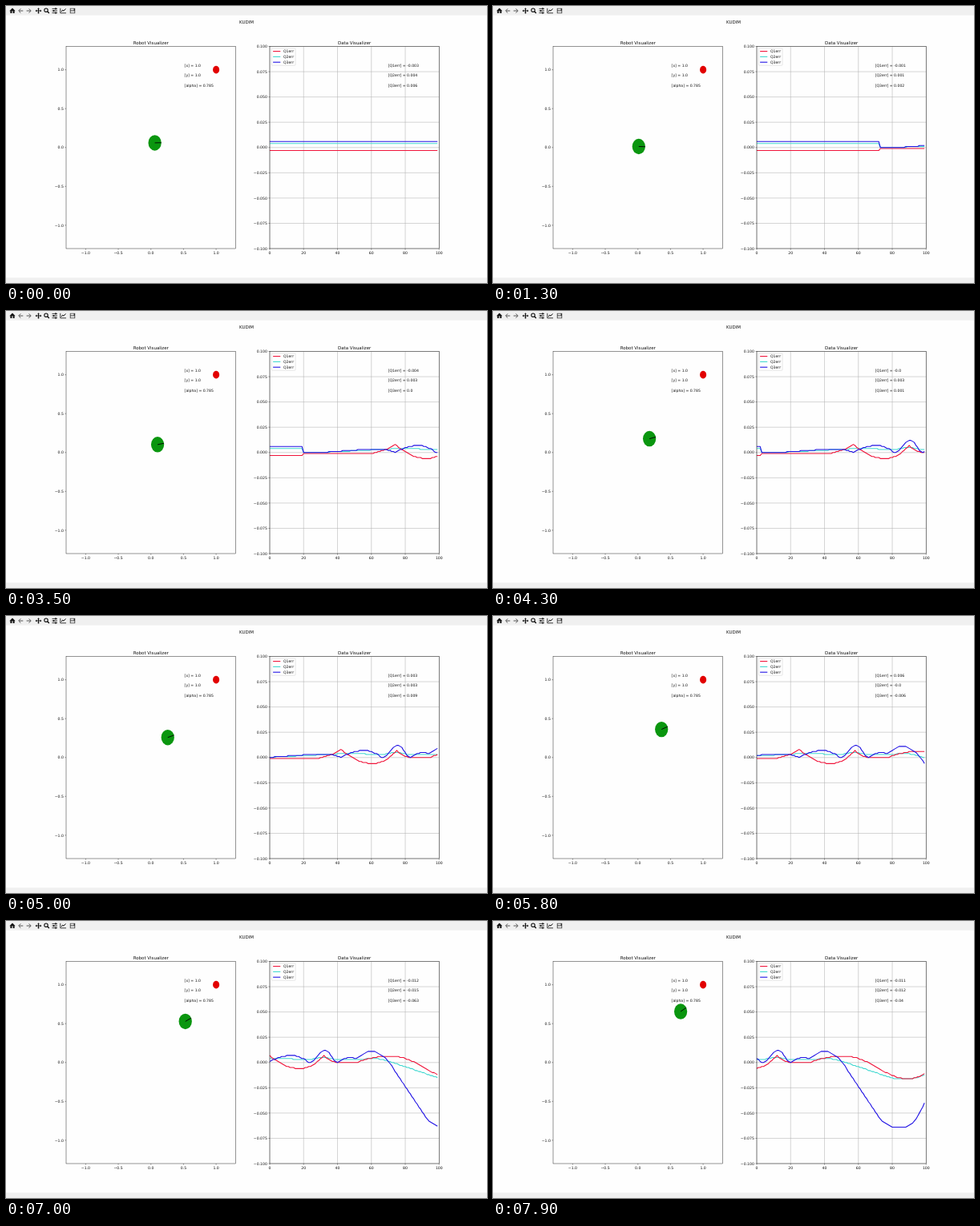
An HTML page with a canvas that plays this animation: 600x346 px, repeating every 8 s.

```html
<!DOCTYPE html>
<html lang="en">
<head>
<meta charset="utf-8">
<title>Robot and data view</title>
<style>
  html, body { margin: 0; width: 100%; height: 100%; overflow: hidden; background: #fefefe; }
  canvas { display: block; width: 600px; height: 346px; }
</style>
</head>
<body>
<canvas id="stage" width="600" height="346"></canvas>
<script>
const ctx = document.getElementById('stage').getContext('2d');
const LOOP = 8000, STEP = 100, WINDOW = 100, RESTART = 100;
const FONT = '"DejaVu Sans", Verdana, sans-serif';
const SMALL = 4.6, LARGE = 5.5, ROW = 12.63;
const TOP = 50.5, BOTTOM = 303, MID = (TOP + BOTTOM) / 2;
const INK = '#111', BAR = '#f0f0f0', GRID = '#b0b0b0';

// Left axes span -1.3..1.3 both ways; right axes span 0..100 by -0.1..0.1.
const left = { x0: 75, x1: 286.5, px: v => 180.75 + v * 81.35, py: v => MID - v * 97.1 };
const right = { x0: 329, x1: 540.3, px: v => 329 + v * 2.113, py: v => MID - v * 1262.5 };

const line = u => u;
const into = u => u * u;
const out = u => u * (2 - u);
const swing = u => (1 - Math.cos(Math.PI * u)) / 2;

// Each turn is [sample, error in thousandths, easing on the way there].
const errors = [
  { name: 'Q1err', color: '#f0143a', idle: -3, turns: [[100, -1], [137, -1, line],
    [154, 8, into], [173, -6, out], [187, 7, into], [196, -.3, out], [206, -.3, line],
    [224, 6, out], [228, 6, line], [264, -16, swing], [282, 0, into]] },
  { name: 'Q2err', color: '#40d8d0', idle: 4, turns: [[110, 0], [158, 4, line],
    [178, 3, swing], [186, 5, swing], [196, 3, swing], [208, 3, line], [215, 4, swing],
    [228, -.3, into], [256, -16, line], [264, -16, line], [284, 0, into]] },
  { name: 'Q3err', color: '#2012e4', idle: 6, turns: [[110, 0], [136, 3, line],
    [148, 3, line], [154, 0, line], [168, 7, out], [178, 0, into], [188, 12, swing],
    [195, 0, swing], [203, 5, out], [206, 4, line], [213, 11, line], [215, 11, line],
    [228, -6, into], [247, -54, line], [257, -64, out], [262, -64, line], [280, -10, into]] }
];

function sample({ idle, turns }, g) {
  if (g < RESTART) return idle;
  const i = turns.findIndex(([end]) => g <= end);
  if (i === 0) return turns[0][1];
  const [start, a] = turns[i - 1], [end, b, ease] = turns[i];
  return Math.round(a + (b - a) * ease((g - start) / (end - start)));
}

// Samples pass at a steady rate with a slight lead around the middle.
const scrolled = n => Math.round(2.245 * n + 3.7 * Math.exp(-(((n - 35) / 16) ** 2)));

// The robot speeds up gently along the diagonal while turning evenly.
function pose(t) {
  if (t < 2 * STEP) return { p: .06, turn: .02 };
  const s = t / 1000;
  return { p: .129 * Math.log(1 + Math.exp((s - 3.33) / .9)), turn: .085 * (s - 1.6) };
}

function decimal(v) {
  if (v === 0) return Object.is(v, -0) ? '-0.0' : '0.0';
  return String(v / 1000);
}

function text(str, x, y, align = 'left', size = SMALL) {
  ctx.font = `${size}px ${FONT}`;
  ctx.textRendering = 'geometricPrecision';
  ctx.textAlign = align;
  ctx.fillStyle = INK;
  ctx.fillText(str, x, y);
}

function path(points, color, width) {
  ctx.beginPath();
  points.forEach(([x, y]) => ctx.lineTo(x, y));
  ctx.strokeStyle = color;
  ctx.lineWidth = width;
  ctx.stroke();
}

function shape(points) {
  ctx.beginPath();
  points.forEach(([x, y]) => ctx.lineTo(x, y));
  ctx.fillStyle = INK;
  ctx.fill();
}

function rect(x, y, w, h, color) {
  ctx.fillStyle = color;
  ctx.fillRect(x, y, w, h);
}

function disc(x, y, r, color) {
  ctx.beginPath();
  ctx.ellipse(left.px(x), left.py(y), r * 81.35, r * 97.1, 0, 0, 7);
  ctx.fillStyle = color;
  ctx.fill();
}

function arrow(x, y, dir) {
  path([[x - 3 * dir, y], [x + 2 * dir, y]], '#555', 1);
  path([[x, y - 2.6], [x + 2.6 * dir, y], [x, y + 2.6]], '#555', 1);
}

function toolbar() {
  rect(0, 0, 600, 11.5, BAR);
  rect(0, 339.5, 600, 6.5, BAR);
  // home
  shape([[4.3, 6.2], [8, 2.6], [11.7, 6.2]]);
  rect(5.4, 6, 2, 3, INK);
  rect(8.6, 6, 2, 3, INK);
  arrow(18.3, 6, -1);
  arrow(28.6, 6, 1);
  // move
  for (let i = 0; i < 4; i++) {
    ctx.save();
    ctx.translate(40.5, 6);
    ctx.rotate(i * Math.PI / 2);
    path([[0, 0], [3, 0]], INK, 1);
    shape([[3.8, 0], [2.2, 1.4], [2.2, -1.4]]);
    ctx.restore();
  }
  // zoom
  ctx.beginPath();
  ctx.arc(50, 5.2, 2.2, 0, 7);
  ctx.strokeStyle = INK;
  ctx.lineWidth = 1.1;
  ctx.stroke();
  path([[51.6, 6.8], [53.8, 9]], INK, 1.4);
  // sliders
  for (let i = 0; i < 3; i++) {
    const y = 3.4 + 2.6 * i;
    path([[57.5, y], [64, y]], INK, .8);
    rect(i === 1 ? 58.8 : 61.2, y - 1, 1.5, 2, INK);
  }
  // chart
  path([[67.8, 2.8], [67.8, 8.8], [75, 8.8]], INK, .8);
  path([[69, 7.2], [70.8, 5], [72, 6.2], [74.5, 3.4]], INK, 1);
  // save
  rect(79.8, 2.8, 6.4, 6.4, '#333');
  rect(80.6, 3.5, 4, 1.9, BAR);
  rect(80.6, 6.3, 4.8, 2.2, BAR);
}

function frameAxes(ax, xs, ys, xDigits, yDigits) {
  const label = (v, digits) => v.toFixed(digits).replace('-', '\u2212');
  for (const v of xs) {
    const x = ax.px(v);
    path([[x, BOTTOM], [x, BOTTOM + 1.6]], INK, .4);
    text(label(v, xDigits), x, 309.9, 'center');
  }
  for (const v of ys) {
    const y = ax.py(v);
    path([[ax.x0 - 1.6, y], [ax.x0, y]], INK, .4);
    text(label(v, yDigits), ax.x0 - 3.2, y + 1.7, 'right');
  }
  ctx.strokeStyle = '#000';
  ctx.lineWidth = .42;
  ctx.strokeRect(ax.x0, TOP, ax.x1 - ax.x0, BOTTOM - TOP);
}

function robotView(t) {
  const { p, turn } = pose(t);
  const tip = [left.px(p + .1 * Math.cos(turn)), left.py(p + .1 * Math.sin(turn))];
  disc(1, 1, .05, '#e20000');
  disc(p, p, .1, '#0a960f');
  path([[left.px(p), left.py(p)], tip], '#000', .9);
  ['[x] = 1.0', '[y] = 1.0', '[alpha] = 0.785'].forEach((s, i) =>
    text(s, 222.6, 75.8 + ROW * i));
  const ticks = [-1, -.5, 0, .5, 1];
  frameAxes(left, ticks, ticks, 1, 1);
  text('Robot Visualizer', 180.75, 47.7, 'center', LARGE);
}

function legend() {
  ctx.beginPath();
  ctx.roundRect(331.3, 52.8, 29.7, 21.4, .9);
  ctx.fillStyle = 'rgba(255,255,255,.8)';
  ctx.fill();
  ctx.strokeStyle = '#ccc';
  ctx.lineWidth = .5;
  ctx.stroke();
  errors.forEach((e, i) => {
    const y = 56.6 + 6.8 * i;
    path([[333.1, y], [342.3, y]], e.color, 1.1);
    text(e.name, 346, y + 1.7);
  });
}

function dataView(n) {
  const xs = Array.from({ length: 6 }, (_, i) => 20 * i);
  const ys = Array.from({ length: 9 }, (_, i) => (i - 4) / 40);
  const first = scrolled(n);
  xs.forEach(v => path([[right.px(v), TOP], [right.px(v), BOTTOM]], GRID, .55));
  ys.forEach(v => path([[right.x0, right.py(v)], [right.x1, right.py(v)]], GRID, .55));

  ctx.lineJoin = 'round';
  // The second curve lies beneath the others.
  for (const e of [errors[1], errors[0], errors[2]]) {
    const points = Array.from({ length: WINDOW }, (_, i) =>
      [right.px(i), right.py(sample(e, first + i) / 1000)]);
    path(points, e.color, 1.1);
  }
  ctx.lineJoin = 'miter';

  frameAxes(right, xs, ys, 0, 3);
  legend();
  errors.forEach((e, i) =>
    text(`[${e.name}] = ${decimal(sample(e, first + WINDOW - 1))}`, 476.7, 75.8 + ROW * i));
  text('Data Visualizer', 434.65, 47.7, 'center', LARGE);
}

function draw(now) {
  const t = Math.floor((now % LOOP) / STEP) * STEP;
  rect(0, 0, 600, 346, '#fefefe');
  toolbar();
  text('KUDIM', 300, 21.6, 'center', LARGE);
  robotView(t);
  dataView(Math.max(0, t / STEP - 1));
}

let start;
function tick(now) {
  start ??= now;
  draw(now - start);
  requestAnimationFrame(tick);
}
draw(0);
requestAnimationFrame(tick);
</script>
</body>
</html>
```
